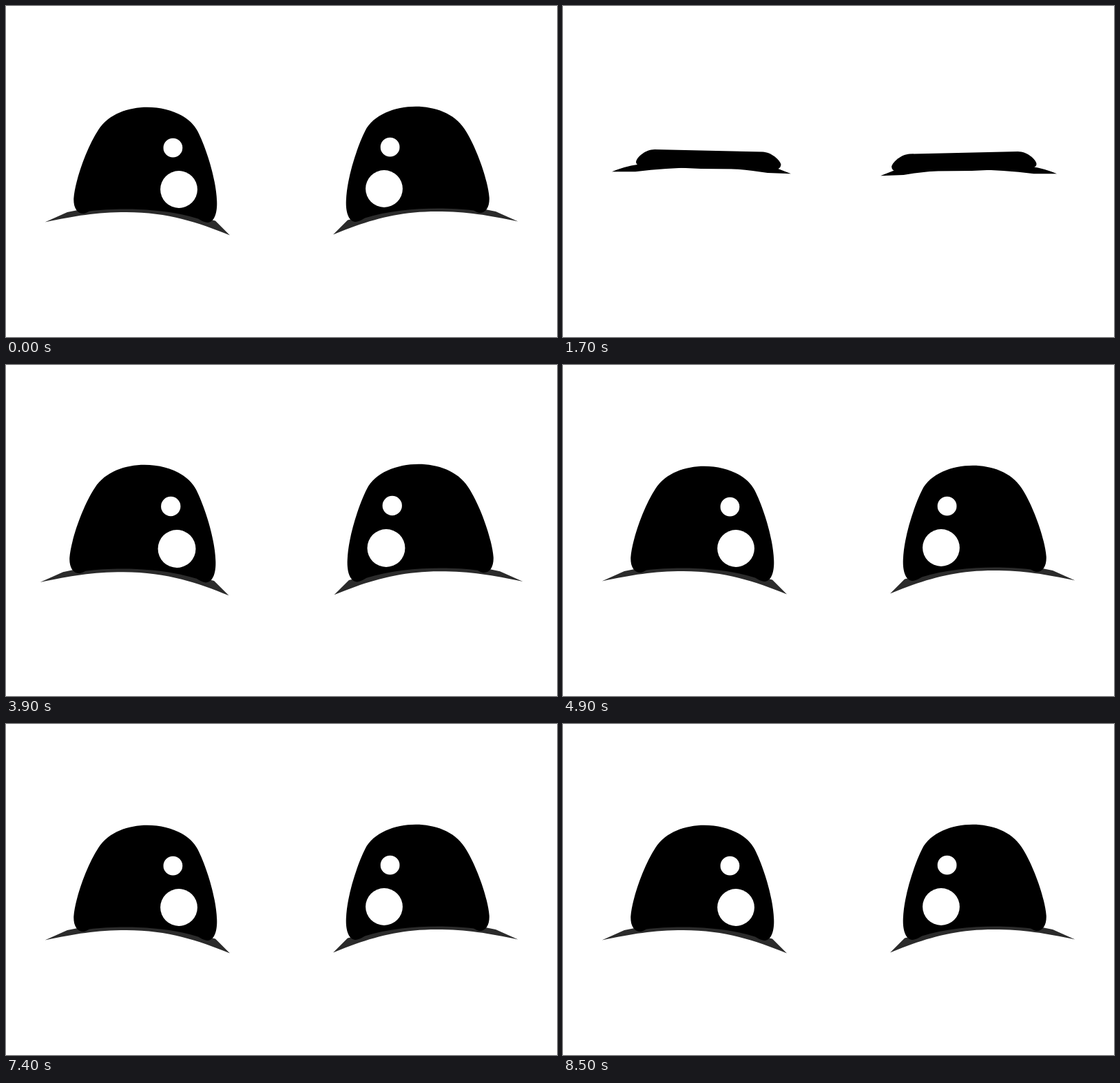
These frames come from a looping animation (800 px wide and 480 px high, 9500 ms). An HTML page:

```html
<!DOCTYPE html>
<html lang="en">
<head>
<meta charset="utf-8">
<title>Blinking eyes</title>
<style>
  html, body { margin: 0; width: 100%; height: 100%; overflow: hidden; background: #fff; }
  svg { display: block; width: 100vw; height: 100vh; }
</style>
</head>
<body>
<svg viewBox="0 0 800 480">
  <defs>
    <g id="eye">
      <path fill="#2b2b2b" d="M56.500 313.500L89 299L104 296C165 290.500 225 293.500 270 303L304 311.500L325 332.500C280 314 235 299 175 299C130 299 100 304.500 56.500 313.500Z"/>
      <path d="M113 301C103 301.500 97.800 292 98.300 279C100 255 116 207 134.500 179C149 156.500 178 146.700 205 146.700C236 146.700 267 159 278.500 182C290.500 206 305 250 306.200 283C307 301 302 314 292 314Q286 313 279 308.500C230 293 165 292 121 297.500Q117 300 113 301Z"/>
      <circle cx="242.400" cy="205.700" r="13.900" fill="#fff"/>
      <circle cx="251" cy="266" r="26.900" fill="#fff"/>
    </g>
    <path id="lid" d="M106 226C107 219 120 208 133 208L290 211.500C302 212 315 223 316.500 230Q316 236 309 237L200 236L112 232Q106 230 106 226Z"/>
    <path id="lash" d="M71 240.300Q90 232.500 108 230L311 235.500L331 243.300L297 242C262 236 228 234.500 195 234.500Q150 234.500 105 240.300Z"/>
  </defs>
  <g id="open">
    <use href="#eye"/>
    <use href="#eye" transform="matrix(-1 0 0 1 800 -1)"/>
  </g>
  <g id="shut" visibility="hidden">
    <use href="#lid"/>
    <use href="#lash"/>
    <use href="#lid" transform="matrix(-1 0 0 1 793.500 3)"/>
    <use href="#lash" transform="matrix(-.985 0 0 1 787 3)"/>
  </g>
</svg>
<script>
  const LOOP = 9500;
  // [start ms, pose]
  const steps = [
    [0, 'open'], [1000, 'shut'], [1200, 'open'], [1700, 'shut'],
    [1900, 'open'], [2400, 'shut'], [2900, 'open'], [3900, 'wide'],
    [4900, 'open'], [5400, 'wide'], [6400, 'open'], [6900, 'shut'],
    [7400, 'open'], [7600, 'wide'], [7800, 'open'], [8000, 'shut'],
    [8500, 'open']
  ];
  const open = document.getElementById('open');
  const shut = document.getElementById('shut');
  const start = performance.now();
  let shown = '';

  function setPose(pose) {
    if (pose === shown) return;
    shown = pose;
    const closed = pose === 'shut';
    const scale = pose === 'wide' ? 1.02 : 1;
    open.setAttribute('visibility', closed ? 'hidden' : 'visible');
    shut.setAttribute('visibility', closed ? 'visible' : 'hidden');
    open.setAttribute('transform', `translate(400 240) scale(${scale}) translate(-400 -240)`);
  }

  function tick(now) {
    const t = Math.max(0, now - start) % LOOP;
    setPose(steps.findLast(([at]) => at <= t)[1]);
    requestAnimationFrame(tick);
  }
  tick(start);
</script>
</body>
</html>
```
